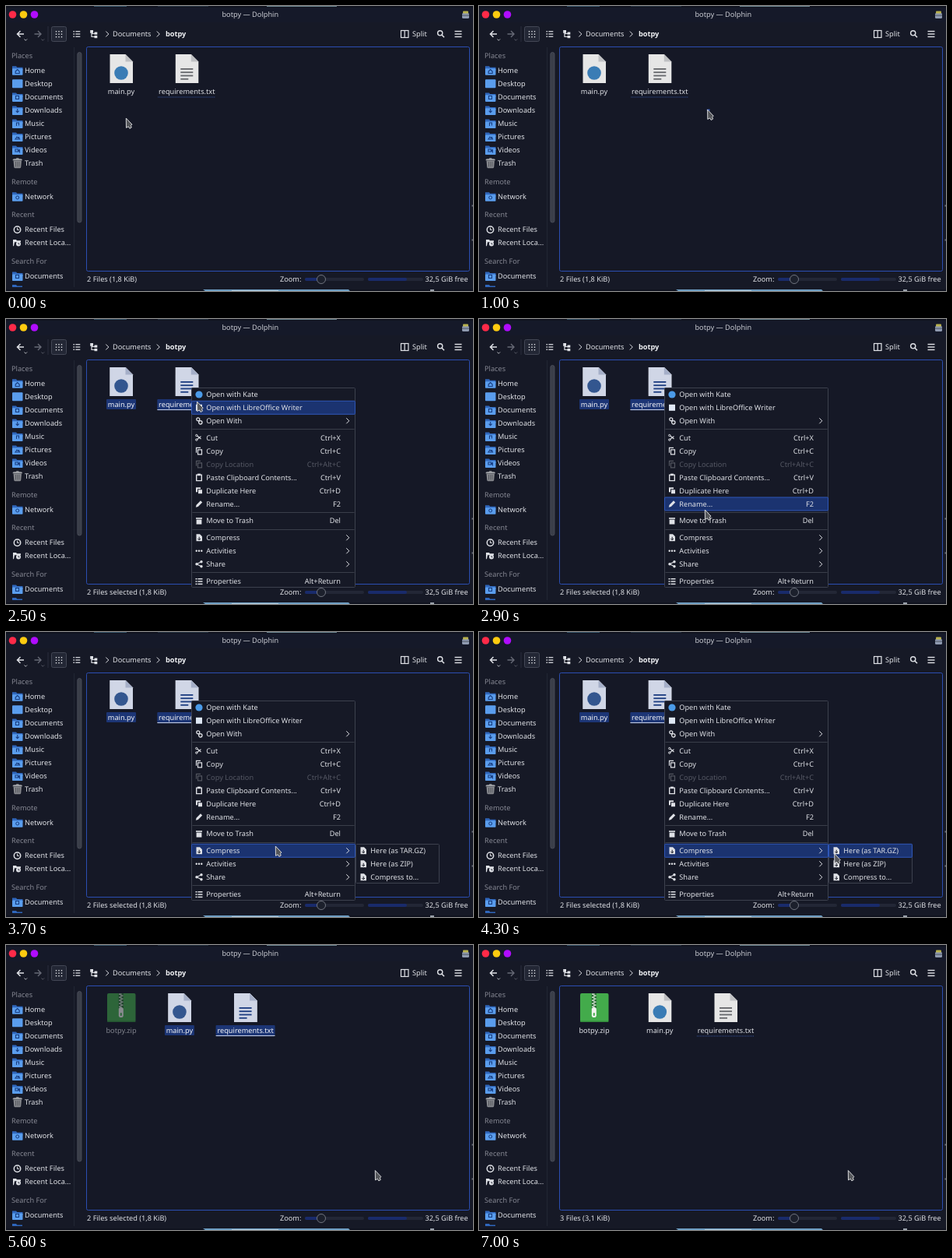
These frames come from a looping animation (600x366 px, 7300 ms). An HTML page:

```html
<!DOCTYPE html>
<html lang="en">
<head>
<meta charset="utf-8">
<title>File manager: compress to ZIP</title>
<style>
html, body { margin: 0; width: 100%; height: 100%; overflow: hidden; background: #10131f }
svg { display: block; width: 600px; height: 366px }
text { font: 9.2px "Noto Sans", "Open Sans", sans-serif; text-rendering: geometricPrecision; white-space: pre }
</style>
</head>
<body>
<svg id="stage" viewBox="0 0 600 366"></svg>
<script>
const INK = '#dfe1e6', DIM = '#858792', BG = '#161926', BLUE = '#2b4eb2';
const stage = document.getElementById('stage');
const $ = id => document.getElementById(id);

// Markup helpers; text y is the vertical middle of the line
const text = (x, y, s, fill = INK, extra = '') =>
  `<text x="${x}" y="${y + 3.2}" fill="${fill}" ${extra}>${s}</text>`;
const mid = 'text-anchor="middle"', end = 'text-anchor="end"';
const rect = (x, y, w, h, fill, extra = '') =>
  `<rect x="${x}" y="${y}" width="${w}" height="${h}" fill="${fill}" ${extra}/>`;
const disc = (x, y, r, fill, extra = '') => `<circle cx="${x}" cy="${y}" r="${r}" fill="${fill}" ${extra}/>`;
const shape = (d, fill, extra = '') => `<path d="${d}" fill="${fill}" ${extra}/>`;
const line = (d, color = INK, w = 1.2) => `<path d="${d}" fill="none" stroke="${color}" stroke-width="${w}"/>`;
const group = (id, body, extra = '') => `<g id="${id}" ${extra}>${body}</g>`;
const at = (x, y, body) => `<g transform="translate(${x} ${y})">${body}</g>`;
const chevron = (x, y, color = INK) => line(`M${x - 1.7} ${y - 3.5}l3.5 3.5l-3.5 3.5`, color, 1);

function backdrop() {
  return rect(0, 0, 600, 366, '#10131f') +
    rect(113, 0, 42, 1, '#38566b') + rect(195, 0, 65, 1, '#263343') + rect(335, 0, 90, 1, '#6d8792') +
    shape('M253 364H440l2 2H256z', '#6f9fc4') + rect(290, 365, 60, 1, '#b2c9d8') +
    rect(545, 364, 5, 2, '#9aa1ab') +
    rect(0, 2, 600, 362, BG, 'rx="3"') + rect(0, 2, 600, 19, '#151929', 'rx="3"');
}

function header() {
  const dots = [0, 1, 2].map(r => [0, 1, 2].map(c => rect(63.8 + c * 3.5, 32 + r * 3.5, 1.4, 1.4, INK)).join('')).join('');
  const bullets = [32.7, 36, 39.3].map(y => rect(86.5, y - .7, 1.5, 1.4, INK) + rect(89.3, y - .6, 6, 1.2, INK)).join('');
  return disc(8.5, 11, 4.8, '#ff2a48') + disc(22.5, 11, 4.8, '#fdcb10') + disc(36.5, 11, 4.8, '#b00cff') +
    text(313.8, 11, 'botpy — Dolphin', '#c9cbd2', mid) +
    rect(586, 9, 9, 7, '#8f9ab0', 'rx="1.5"') + rect(587, 6.5, 7, 3, '#b9b24e', 'rx="1"') + rect(586, 11.5, 9, 1.2, '#596272') +
    line('M23 36H15M18.5 32L14.5 36l4 4', INK, 1.5) + line('M23.5 42.5l1.8 1.8l1.8-1.8', INK, .8) +
    line('M36.5 36H44.5M41 32l4 4l-4 4', '#666975', 1.4) + line('M45.5 42.5l1.8 1.8l1.8-1.8', '#666975', .8) +
    rect(53.5, 26, 1, 20, '#2b2f3d') +
    rect(58.5, 26.5, 19, 19, '#232735', 'rx="2" stroke="#434755"') + dots + bullets +
    line('M110 33v6.5h4M110 35.5h4') + rect(108.2, 31, 3.8, 3.8, INK) +
    rect(113.5, 33.5, 3.8, 3.2, INK) + rect(113.5, 38, 3.8, 3.2, INK) +
    chevron(130, 36) + text(137, 36, 'Documents') + chevron(195.5, 36) +
    text(205, 36, 'botpy', '#f1f2f5', 'style="font-weight:bold"') +
    rect(507.5, 31.5, 9.5, 9, 'none', `stroke="${INK}" stroke-width="1.2"`) + line('M512.2 31v10') +
    text(522, 36, 'Split') +
    disc(557.7, 34.8, 3.1, 'none', `stroke="${INK}" stroke-width="1.4"`) + line('M560 37.2l3 3', INK, 1.6) +
    [32.5, 36, 39.5].map(y => rect(576.5, y - .7, 9, 1.4, INK)).join('');
}

const folder = y => at(8, y - 6,
  shape('M0 .5h5l1.3 1.5H13.5v4H0z', '#2f66bb') + rect(0, 3.4, 13.5, 8.6, '#5a9ded', 'rx=".8"'));

function sidebar() {
  const marks = {
    Home: 'M12.2 84l2.5-2.5l2.5 2.5v2.5h-5z', Desktop: '', Documents: 'M12.5 115.5h4v4h-4z',
    Downloads: 'M14.7 132v4.5M12.7 134.7l2 2l2-2', Music: 'M13.5 154v-4h3v3.5', Pictures: 'M12 171l2-3l1.5 1.5l1-1l1 2.5z',
    Videos: 'M12 184h3.5v3h-3.5zM16 185.5l1.5-1v3z'
  };
  let s = rect(87, 53, 1, 308, '#222633');
  Object.entries(marks).forEach(([name, d], i) => {
    const y = 82.8 + i * 17.05;
    s += (d ? folder(y) + line(d, '#173c80', 1.1) : rect(8, y - 5.5, 13.5, 11, '#5a9ded', 'rx="1"')) + text(24, y, name);
  });
  [['Places', 63.8], ['Remote', 225.8], ['Recent', 268], ['Search For', 328]].forEach(([name, y]) => s += text(7, y, name, DIM));
  s += shape('M9.5 198.5h10.5l-.8 8.5q-.2 1.3-1.5 1.3h-5.9q-1.3 0-1.5-1.3z', '#85878c') +
    line('M12.5 200v6.5M14.8 200v6.5M17 200v6.5', '#4a4c54', .8) +
    shape('M8.5 198.2q0-2 2-2h2l1-1h2.5l1 1h2q2 0 2 2z', '#a0a2a6') + text(24, 201.8, 'Trash') +
    folder(244.8) + disc(14.7, 246, 2, 'none', 'stroke="#173c80"') + text(24, 244.8, 'Network') +
    disc(14.5, 287.2, 4.2, 'none', `stroke="${INK}" stroke-width="1.5"`) + line('M14.5 284.7v2.8h2.3', INK, 1) +
    text(24, 287, 'Recent Files') +
    shape('M9 300h4l1 1.2h5v2h-8l-1 5H9z', INK) + disc(16, 305.6, 3, INK) + line('M16 304v1.8h1.5', BG, .8) +
    text(24, 304, 'Recent Loca...') +
    folder(347) + line('M12.5 345.5h4v4h-4z', '#173c80', 1.1) + text(24, 347, 'Documents') +
    shape('M8 358h5l1.3 1.5H21v1.5H8z', '#2f66bb');
  return s + rect(91.8, 59.5, 5.2, 218.5, '#3a3e49', 'rx="2.5" stroke="#4d515c" stroke-width=".8"');
}

const groove = (x, w, filled) =>
  rect(x, 349, w, 4, '#232736', 'rx="2"') + rect(x, 349, filled, 4, '#192b6b', 'rx="2"');

function footer() {
  return `<text id="status" x="104" y="354.2" fill="${INK}"></text>` +
    text(352, 351, 'Zoom:') + groove(384, 76, 20) +
    disc(405, 351, 5.5, '#1c202c', 'stroke="#70747f"') +
    groove(465, 71, 50) + text(538.5, 351, '32,5 GiB free');
}

// A document icon with its label, centred on x = 0, plus a selected look on top
function fileItem(id, name, half, mark, underline) {
  const look = (paper, fold, ink) => shape('M-14.5 62H5.5l9.5 9.5V99H-14.5z', paper) + shape('M5.5 62v9.5h9.5z', fold) + mark(ink);
  const normal = look('#e6e6e6', '#bfc0c3', 0) + text(0, 109.5, name, INK, mid) +
    (underline ? `<path d="M${-half + 1} 117h${2 * half - 2}" stroke="#35559f" stroke-dasharray="1 1"/>` : '');
  const chosen = look('#d0d6e6', '#a5afc8', 1) + rect(-half, 103, 2 * half, 13, '#1c3575', 'rx="1"') +
    text(0, 109.5, name, '#f4f5f8', mid) + (underline ? rect(-half, 116, 2 * half, 1, '#c3cbe0') : '');
  return group(id, normal + group(id + 'Sel', chosen));
}
const badge = on => disc(0, 86, 8.8, on ? '#33568f' : '#3a7cb5');
const lines = on => [80, 84.3, 88.6, 92.9].map((y, i) =>
  rect(-8, y, i == 3 ? 10 : 16, 1.8, on ? '#1c3c80' : '#65676b')).join('');

function zipItem() {
  let teeth = '';
  for (let i = 0; i < 9; i++) teeth += rect(i % 2 ? -1 : -3, 62.5 + i * 2, 3.5, 1.3, '#f0f2ee');
  return group('zip', rect(-18, 62, 36.5, 37, '#43ab4b', 'rx="2"') + rect(-18, 97.5, 36.5, 1.5, '#338b3c', 'rx="1"') +
    rect(-3.5, 62, 6.5, 19, '#286e32') + teeth + rect(-3.2, 80, 6, 13, '#f0f2ee', 'rx="2.8"') +
    rect(-1.2, 87, 2, 4, '#43ab4b', 'rx="1"') + text(0, 109.5, 'botpy.zip', INK, mid), 'transform="translate(148 0)"');
}

// Menu icons, centred on the origin
const box = shape('M-3.5-4.5h4.5l3 3v6h-7.5z', INK) + line('M.2-1v4M-1.6 1.2l1.8 1.8l1.8-1.8', BG, 1);
const pages = line('M-1.5-1.5h5v6h-5zM-3.5 2.5v-6.5h5.5');
const icons = {
  dot: disc(0, 0, 4.6, '#4b9be8'),
  square: rect(-4, -4, 8, 8, '#dfe8f5'),
  gears: disc(-1.2, -2, 2, 'none', `stroke="${INK}" stroke-width="1.3"`) + disc(1.8, 2, 2.2, 'none', `stroke="${INK}" stroke-width="1.3"`),
  cut: line('M-4-3.5L2.5 1.7M-4 3.5L2.5-1.7') + disc(-3.2, -2.8, 1.2, BG, `stroke="${INK}"`) + disc(-3.2, 2.8, 1.2, BG, `stroke="${INK}"`),
  copy: pages,
  faded: `<g opacity=".3">${pages}</g>`,
  paste: line('M-3.3-3.2h6.6v7.5h-6.6z', INK, 1.4) + rect(-2, -4.7, 4, 2.6, INK),
  twin: rect(-4, -4, 6, 6, INK) + rect(-1.5, -1.5, 6, 6, INK, `stroke="${BG}"`),
  pen: shape('M-4.2 4.2l.8-3L2-4.2l2.2 2.2L-1.2 3.4z', INK),
  bin: rect(-4, -4, 8, 1.6, INK) + shape('M-3.4-1.6h6.8v6h-6.8z', INK),
  box,
  more: [-3.3, 0, 3.3].map(x => disc(x, 0, 1.2, INK)).join(''),
  share: line('M3-3L-3 0l6 3') + [[3, -3], [-3, 0], [3, 3]].map(p => disc(...p, 1.7, INK)).join(''),
  props: [-3.5, -.2, 3.1].map(y => rect(-4.5, y, 2, 1.5, INK) + rect(-1.5, y, 6, 1.5, INK)).join('')
};

// y, icon, label, shortcut ('>' opens a submenu)
const mainRows = [
  [97, 'dot', 'Open with Kate'], [113.8, 'square', 'Open with LibreOffice Writer'], [130.8, 'gears', 'Open With', '>'],
  [152.3, 'cut', 'Cut', 'Ctrl+X'], [169.3, 'copy', 'Copy', 'Ctrl+C'], [186.3, 'faded', 'Copy Location', 'Ctrl+Alt+C'],
  [203.3, 'paste', 'Paste Clipboard Contents...', 'Ctrl+V'], [220.3, 'twin', 'Duplicate Here', 'Ctrl+D'],
  [237.5, 'pen', 'Rename...', 'F2'], [259.2, 'bin', 'Move to Trash', 'Del'],
  [280.8, 'box', 'Compress', '>'], [297.8, 'more', 'Activities', '>'], [314.8, 'share', 'Share', '>'],
  [336.5, 'props', 'Properties', 'Alt+Return']
];
const subRows = [[280.8, 'box', 'Here (as TAR.GZ)'], [297.8, 'box', 'Here (as ZIP)'], [314.8, 'box', 'Compress to...']];
const COMPRESS = 280.8;

function menu(id, x, y, w, h, rows, seams = []) {
  const cells = rows.map(([cy, icon, label, key]) => {
    const fill = icon == 'faded' ? '#555864' : INK;
    const tail = !key ? '' : key == '>' ? chevron(x + 200.5, cy) : text(x + 191.5, cy, key, fill, end);
    return at(x + 9.5, cy, icons[icon]) + text(x + 18.8, cy, label, fill) + tail;
  }).join('');
  return group(id, rect(x, y, w, h, BG, 'stroke="#3d414e" rx="1"') +
    seams.map(sy => rect(x + 1, sy, w - 2, 1, '#3a3e4a')).join('') +
    rect(x, 0, w, 17, '#1b3370', `id="${id}Hot" stroke="#2f57b8" rx="1"`) + cells);
}

stage.innerHTML = backdrop() + header() + sidebar() +
  rect(103.5, 52.5, 492, 288, '#151826', `stroke="${BLUE}" rx="2"`) + footer() +
  rect(598.5, 255.5, 1.5, 2, '#6c727d') + rect(598.5, 299.5, 1.5, 2, '#6c727d') +
  zipItem() + fileItem('main', 'main.py', 19, badge) + fileItem('req', 'requirements.txt', 38, lines, true) +
  group('minus', disc(219, 67, 6.3, '#70747d') + rect(216, 66.4, 6, 1.2, '#b6b9c2')) +
  rect(0, 0, 0, 0, '#2c4fae', 'id="band" fill-opacity=".25" stroke="#3c62c4"') +
  menu('menu', 238.5, 88.5, 210, 256, mainRows, [141, 248, 270, 325]) +
  menu('sub', 449.5, 272.5, 107, 50, subRows) +
  group('cursor', shape('M.3 0L.5 12.4L3.3 10.8L4.9 13.4L7.3 12L6.3 9.4L8 8.2Z', '#55575b', 'stroke="#d4d5d8" stroke-linejoin="round"'));

// Pointer stops: time, x, y
const stops = [
  [0, 154, 144], [800, 262, 140], [950, 296, 134], [1600, 135, 80], [2000, 238, 87], [2400, 240, 90],
  [2900, 290, 245], [3250, 322, 281], [3700, 346, 275], [4250, 455, 284], [4600, 480, 295],
  [4900, 480, 294], [5600, 474, 289.5], [7300, 474, 289.5]
];
const ramp = (t, a, b) => Math.min(1, Math.max(0, (t - a) / (b - a)));
const mix = (a, b, k) => a + (b - a) * k;

function pointer(t) {
  const i = stops.findIndex(s => s[0] > t);
  const [a, b] = [stops[i - 1], stops[i]];
  const u = ramp(t, a[0], b[0]), k = u * u * (3 - 2 * u);
  return [mix(a[1], b[1], k), mix(a[2], b[2], k)];
}

const set = (id, values) => Object.entries(values).forEach(([k, v]) => $(id).setAttribute(k, v));
const show = (id, opacity) => set(id, { opacity });

function highlight(id, rows, y) {
  const row = rows.find(r => Math.abs(r[0] - y) <= 8.6);
  show(id + 'Hot', row ? 1 : 0);
  if (row) set(id + 'Hot', { y: row[0] - 8.5 });
}

function draw(t) {
  const [x, y] = pointer(t);
  set('cursor', { transform: `translate(${x} ${y})` });

  const slide = 1 - (1 - ramp(t, 5400, 5700)) ** 2;
  set('main', { transform: `translate(${mix(148, 232.3, slide)} 0)` });
  set('req', { transform: `translate(${mix(232.3, 317, slide)} 0)` });
  show('zip', ramp(t, 5400, 5780));

  const release = 1 - ramp(t, 6050, 6350);
  show('mainSel', t < 1500 ? 0 : release);
  show('reqSel', t < 1200 ? 0 : release);
  show('minus', t >= 1900 && t < 2300 ? .7 : 0);
  $('status').textContent = t < 1500 ? '2 Files (1,8 KiB)' : t < 6700 ? '2 Files selected (1,8 KiB)' : '3 Files (3,1 KiB)';

  const dragging = t >= 950 && t < 1600;
  show('band', dragging ? 1 : 0);
  if (dragging) set('band', { x, y, width: 296 - x, height: 134 - y });

  const close = 1 - ramp(t, 4800, 4925);
  show('menu', ramp(t, 2200, 2350) * close);
  show('sub', ramp(t, 3350, 3500) * close);
  const inSub = x > 449;
  highlight('menu', mainRows, inSub ? COMPRESS : y);
  highlight('sub', subRows, inSub ? y : -99);
}

function tick(now) {
  draw(Math.min(7000, Math.floor(now % 7300 / 100) * 100));
  requestAnimationFrame(tick);
}
requestAnimationFrame(tick);
</script>
</body>
</html>
```
